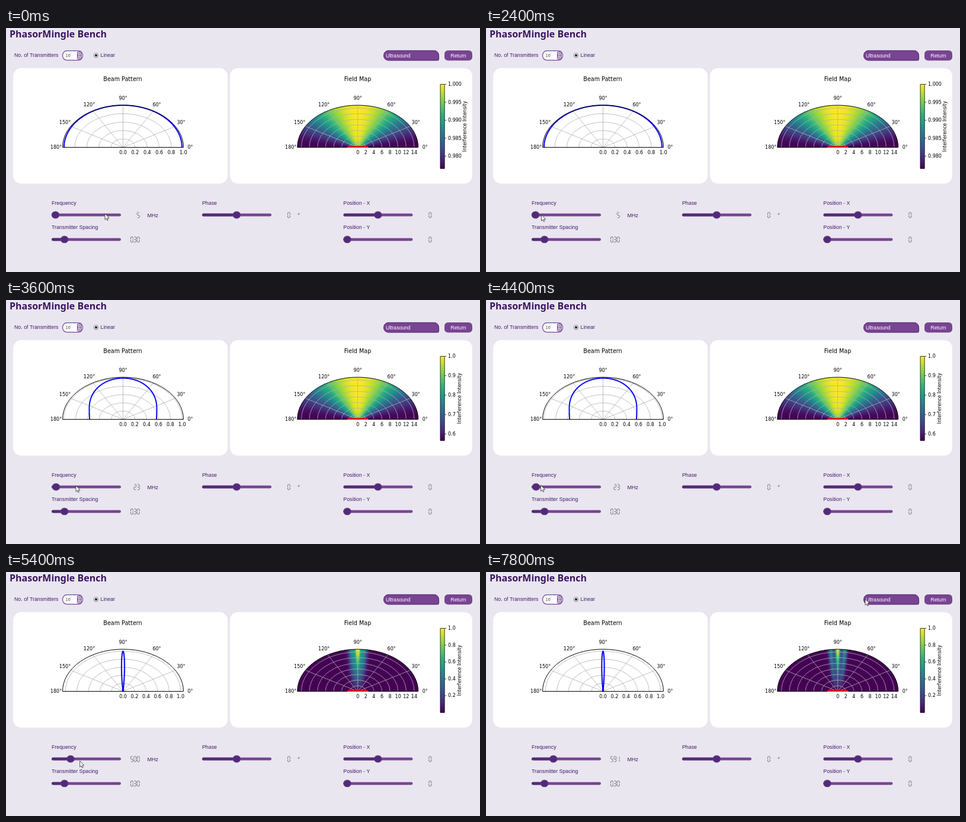
An HTML page with a canvas that plays this animation: 800 px wide and 414 px high, repeating every 8 s.

```html
<!DOCTYPE html>
<html lang="en">
<head>
<meta charset="utf-8">
<title>Beam simulator</title>
<style>
html, body { margin: 0; width: 100%; height: 100%; overflow: hidden; background: #e9e6f0; }
canvas { display: block; width: 800px; height: 414px; }
</style>
</head>
<body>
<canvas id="stage"></canvas>
<script>
const LOOP = 8000, STEP = 200;
const W = 800, H = 414, RX = 102, RY = 71.5, BASE = 202.5;
const BEAM_X = 197.5, FIELD_X = 593.7;
const COUNT = 16, SPACING = 0.3, RANGE = 15;
const SANS = '"Liberation Sans", Arial, sans-serif';
const PLOT = '"DejaVu Sans", sans-serif';
const INK = '#431a68', DARK = '#552a7b', MID = '#794493', LCD = '#625e6c';

const canvas = document.getElementById('stage');
const ratio = window.devicePixelRatio || 1;
canvas.width = W * ratio;
canvas.height = H * ratio;
const ctx = canvas.getContext('2d');
ctx.scale(ratio, ratio);

// [time, value]
const frequencies = [[0, 5], [3600, 23.8], [4600, 500], [5600, 591]];
// [time, x, y]
const pointer = [
  [0, 167, 315], [400, 142, 318], [800, 104, 322], [1000, 95, 325],
  [1200, 86, 335], [1400, 88, 328], [1800, 93.5, 317], [2400, 93.5, 317],
  [3200, 121, 315], [3600, 118, 315], [4600, 86, 314], [5000, 84, 329],
  [5200, 100, 328], [5800, 174, 306], [6200, 397, 174], [6400, 495, 115],
  [6600, 570, 75], [6800, 622, 53], [7000, 650, 44], [7800, 640, 46]
];
const viridis = ['440154', '472d7b', '3b528b', '2c728e', '21918c', '28ae80', '5ec962', 'addc30', 'fde725']
  .map(c => [0, 2, 4].map(i => parseInt(c.slice(i, i + 2), 16)));

function colour(v) {
  const p = Math.min(1, Math.max(0, v)) * 8, i = Math.min(7, Math.floor(p));
  return viridis[i].map((c, k) => c + (viridis[i + 1][k] - c) * (p - i));
}

function pointerAt(t) {
  const i = pointer.findIndex(k => k[0] > t);
  if (i < 0) return pointer[pointer.length - 1].slice(1);
  const a = pointer[i - 1], b = pointer[i], u = (t - a[0]) / (b[0] - a[0]);
  return [a[1] + (b[1] - a[1]) * u, a[2] + (b[2] - a[2]) * u];
}

// Far-field power pattern of the line array
function power(freq, cos) {
  const x = 0.0534 * freq * cos;
  if (Math.abs(x) < 1e-6) return 1;
  return (Math.sin(x) / (COUNT * Math.sin(x / COUNT))) ** 2;
}

const floorOf = freq => freq < 100 ? power(freq, 1) : 0;
const elementX = i => (i - (COUNT - 1) / 2) * SPACING;

// Sum of the waves from all elements, x and y in array units
function interference(freq, x, y) {
  const k = 0.0534 * freq * 2 / (COUNT * SPACING);
  let re = 0, im = 0;
  for (let i = 0; i < COUNT; i++) {
    const phase = k * Math.hypot(x - elementX(i), y);
    re += Math.cos(phase);
    im += Math.sin(phase);
  }
  return (re * re + im * im) / COUNT ** 2;
}

// Relative field strength, dx and dy in pixels from the array centre
function fieldAt(freq, dx, dy) {
  if (freq < 100) {
    const low = floorOf(freq);
    return (interference(freq, dx / RX * RANGE, dy / RY * RANGE) - low) / (1 - low);
  }
  const split = (freq - 500) / 91, h = Math.max(0, dy / RY), u = Math.abs(dx);
  const bell = (d, w) => Math.exp(-((d / w) ** 2));
  return h ** 1.6 * bell(u, 4.5 - split * 0.5)
    + 0.46 * h ** 0.8 * bell(u - (10 + 2 * split) * Math.sqrt(h), 6 - 2 * split)
    + 0.12 * h * bell(u, 14);
}

const fieldCache = new Map();
function fieldImage(freq) {
  if (fieldCache.has(freq)) return fieldCache.get(freq);
  const c = document.createElement('canvas');
  c.width = RX * 4;
  c.height = RY * 2;
  const g = c.getContext('2d'), img = g.createImageData(c.width, c.height);
  for (let y = 0, i = 0; y < c.height; y++) {
    for (let x = 0; x < c.width; x++, i += 4) {
      const rgb = colour(fieldAt(freq, (x + 0.5) / 2 - RX, RY - (y + 0.5) / 2));
      img.data.set([...rgb, 255], i);
    }
  }
  g.putImageData(img, 0, 0);
  fieldCache.set(freq, c);
  return c;
}
frequencies.forEach(k => fieldImage(k[1]));

function text(str, x, y, size, fill, family = SANS, align = 'left') {
  ctx.font = `${size}px ${family}`;
  ctx.fillStyle = fill;
  ctx.textAlign = align;
  ctx.textBaseline = 'middle';
  ctx.fillText(str, x, y);
}

const label = (str, x, y) => text(str, x, y, 8.8, INK);
const plotText = (str, x, y, align = 'center', size = 8) => text(str, x, y, size, '#000', PLOT, align);

function box(x, y, w, h, r, fill, stroke, width = 1) {
  ctx.beginPath();
  ctx.roundRect(x, y, w, h, r);
  if (fill) { ctx.fillStyle = fill; ctx.fill(); }
  if (stroke) { ctx.strokeStyle = stroke; ctx.lineWidth = width; ctx.stroke(); }
}

function line(points, stroke, width) {
  ctx.beginPath();
  points.forEach(([x, y]) => ctx.lineTo(x, y));
  ctx.strokeStyle = stroke;
  ctx.lineWidth = width;
  ctx.stroke();
}

function arc(cx, r) {
  ctx.beginPath();
  ctx.ellipse(cx, BASE, RX * r, RY * r, 0, Math.PI, 2 * Math.PI);
}

function polarGrid(cx, ticks, limit) {
  for (let deg = 30; deg < 180; deg += 30) {
    const a = deg * Math.PI / 180;
    line([[cx, BASE], [cx + RX * Math.cos(a), BASE - RY * Math.sin(a)]], '#b0b0b0', 0.8);
  }
  for (const r of ticks) {
    if (r <= 0 || r > limit) continue;
    arc(cx, r / limit);
    ctx.stroke();
  }
}

function polarFrame(cx, ticks, limit, digits) {
  arc(cx, 1);
  ctx.closePath();
  ctx.strokeStyle = '#000';
  ctx.lineWidth = 1;
  ctx.stroke();
  const marks = [[0, 113.5, 0], [30, 98, -42], [60, 57, -72], [90, 0, -83],
    [120, -57, -72], [150, -98, -42], [180, -113, 0]];
  for (const [deg, dx, dy] of marks) plotText(deg + '°', cx + dx, BASE + dy);
  for (const r of ticks) plotText(r.toFixed(digits), cx + RX * r / limit, 212);
}

function beamPlot(freq) {
  const ticks = [0, 0.2, 0.4, 0.6, 0.8, 1], limit = 1 + 0.05 * (1 - floorOf(freq));
  plotText('Beam Pattern', 197, 87, 'center', 9.6);
  polarGrid(BEAM_X, ticks, limit);
  const curve = [];
  for (let i = 0; i <= 720; i++) {
    const a = i * Math.PI / 720, r = power(freq, Math.cos(a)) / limit;
    curve.push([BEAM_X + RX * r * Math.cos(a), BASE - RY * r * Math.sin(a)]);
  }
  ctx.lineJoin = 'round';
  line(curve, '#0000f0', 1.9);
  polarFrame(BEAM_X, ticks, limit, 1);
}

function fieldPlot(freq) {
  const ticks = [0, 2, 4, 6, 8, 10, 12, 14];
  plotText('Field Map', 593.5, 87, 'center', 9.6);
  ctx.save();
  arc(FIELD_X, 1);
  ctx.clip();
  ctx.drawImage(fieldImage(freq), FIELD_X - RX, BASE - RY, 2 * RX, RY);
  polarGrid(FIELD_X, ticks, RANGE);
  ctx.restore();
  polarFrame(FIELD_X, ticks, RANGE, 0);
  ctx.save();
  ctx.beginPath();
  ctx.rect(FIELD_X - RX, BASE - RY, 2 * RX, RY + 0.5);
  ctx.clip();
  ctx.fillStyle = '#d8161f';
  for (let i = 0; i < COUNT; i++) {
    ctx.beginPath();
    ctx.arc(FIELD_X + elementX(i) * RX / RANGE, BASE, 2.4, 0, 7);
    ctx.fill();
  }
  ctx.restore();
}

function colourBar(freq) {
  const top = 95.5, height = 143, low = floorOf(freq), fine = low > 0.9;
  const grad = ctx.createLinearGradient(0, top + height, 0, top);
  viridis.forEach((c, i) => grad.addColorStop(i / 8, `rgb(${c})`));
  ctx.fillStyle = grad;
  ctx.fillRect(733, top, 7.2, height);
  ctx.strokeStyle = '#000';
  ctx.lineWidth = 0.75;
  ctx.strokeRect(733, top, 7.2, height);
  const step = fine ? 0.005 : low > 0.4 ? 0.1 : 0.2;
  for (let v = 1; v > low + 0.001; v -= step) {
    const y = top + (1 - v) / (1 - low) * height;
    line([[740.2, y], [743, y]], '#000', 0.75);
    plotText(v.toFixed(fine ? 3 : 1), 746, y + 0.5, 'left');
  }
  ctx.save();
  ctx.translate(fine ? 775 : 765.5, 167);
  ctx.rotate(-Math.PI / 2);
  plotText('Interference Intensity', 0, 0);
  ctx.restore();
}

function slider(x, y, knob) {
  box(x, y - 2.4, 117, 4.8, 2.4, MID);
  box(x, y - 2.4, knob - x, 4.8, 2.4, DARK);
  box(knob - 6.3, y - 5.8, 12.6, 11.6, 5.6, '#54297a', '#684086', 0.8);
}

// Segment masks: top, upper right, lower right, bottom, lower left, upper left, middle
const segments = [0x3f, 0x06, 0x5b, 0x4f, 0x66, 0x6d, 0x7d, 0x07, 0x7f, 0x6f];
function digits(str, right, y) {
  const w = 3.8, h = 4.4, gap = 0.5;
  let x = right - w;
  for (const ch of [...str].reverse()) {
    if (ch === '.') {
      ctx.fillStyle = LCD;
      ctx.fillRect(x + w + 0.5, y + 2 * h - 0.7, 0.9, 0.9);
      continue;
    }
    const sides = [
      [gap, 0, w - gap, 0], [w, gap, w, h - gap], [w, h + gap, w, 2 * h - gap],
      [gap, 2 * h, w - gap, 2 * h], [0, h + gap, 0, 2 * h - gap], [0, gap, 0, h - gap],
      [gap, h, w - gap, h]
    ];
    sides.forEach(([a, b, c, d], i) => {
      if (segments[ch] >> i & 1) line([[x + a, y + b], [x + c, y + d]], LCD, 0.85);
    });
    x -= 5.5;
  }
}

function topBar() {
  ctx.font = 'bold 16px "Noto Sans", sans-serif';
  ctx.fillStyle = '#3c1361';
  ctx.textAlign = 'left';
  ctx.textBaseline = 'alphabetic';
  ctx.fillText('PhasorMingle Bench', 6, 15.8);

  label('No. of Transmitters', 14, 47);
  box(95.5, 38.7, 34, 16, 7.5, '#fbfafd', MID, 1.2);
  text('16', 100.5, 47.3, 7.6, '#5c5c60');
  box(120.5, 40.5, 6.5, 12.5, 1.5, '#d5c8e0', DARK, 0.9);
  line([[120.5, 46.8], [127, 46.8]], DARK, 0.8);
  line([[122.2, 44.7], [123.7, 42.8], [125.2, 44.7]], DARK, 0.8);
  line([[122.2, 49], [123.7, 50.9], [125.2, 49]], DARK, 0.8);

  ctx.beginPath();
  ctx.arc(152, 46.5, 3.7, 0, 7);
  ctx.fillStyle = '#fff';
  ctx.fill();
  ctx.strokeStyle = '#444';
  ctx.lineWidth = 0.7;
  ctx.stroke();
  ctx.beginPath();
  ctx.arc(152, 46.5, 2.1, 0, 7);
  ctx.fillStyle = '#222';
  ctx.fill();
  label('Linear', 159.5, 47);

  box(637.5, 38.3, 93, 16.7, [8, 8, 2, 8], MID, '#4d2270', 1);
  text('Ultrasound', 641, 47.3, 8.6, '#fff');
  box(740, 38, 47, 17.3, 6, MID);
  text('Return', 763.5, 47.3, 8.8, '#fff', SANS, 'center');
}

function controls(freq) {
  label('Frequency', 77, 297.3);
  slider(77, 317.2, 83.5 + (freq - 5) * 0.0515);
  digits(String(Math.floor(freq)), 225.2, 313);
  text('MHz', 238.5, 318.5, 9, INK);
  label('Transmitter Spacing', 77, 339);
  slider(77, 358.8, 98.7);
  digits('0.30', 225.2, 354.5);
  label('Phase', 331, 297.3);
  slider(331, 317.2, 389.3);
  digits('0', 479.3, 313);
  text('°', 492.3, 318.5, 9, INK);
  label('Position - X', 569.3, 297.3);
  slider(569.5, 317.2, 627.8);
  digits('0', 717.7, 313);
  label('Position - Y', 569.3, 339);
  slider(569.5, 358.8, 576);
  digits('0', 717.7, 354.5);
}

function arrow(x, y) {
  const shape = [[0, 0], [0, 10.2], [2.3, 8.1], [3.8, 11.5], [5.4, 10.8], [4, 7.5], [7.1, 7.3]];
  ctx.beginPath();
  shape.forEach(([a, b]) => ctx.lineTo(x + a, y + b));
  ctx.closePath();
  ctx.fillStyle = '#fff';
  ctx.fill();
  ctx.strokeStyle = '#2a2a30';
  ctx.lineWidth = 0.8;
  ctx.stroke();
}

function draw(now) {
  const t = Math.floor((now % LOOP) / STEP) * STEP;
  const freq = frequencies.filter(k => k[0] <= t).pop()[1];
  ctx.fillStyle = '#e9e6f0';
  ctx.fillRect(0, 0, W, H);
  topBar();
  box(12, 68, 362, 196, 14, '#fff');
  box(378, 68, 409, 196, 14, '#fff');
  beamPlot(freq);
  fieldPlot(freq);
  colourBar(freq);
  controls(freq);
  arrow(...pointerAt(t));
  requestAnimationFrame(draw);
}
requestAnimationFrame(draw);
</script>
</body>
</html>
```
